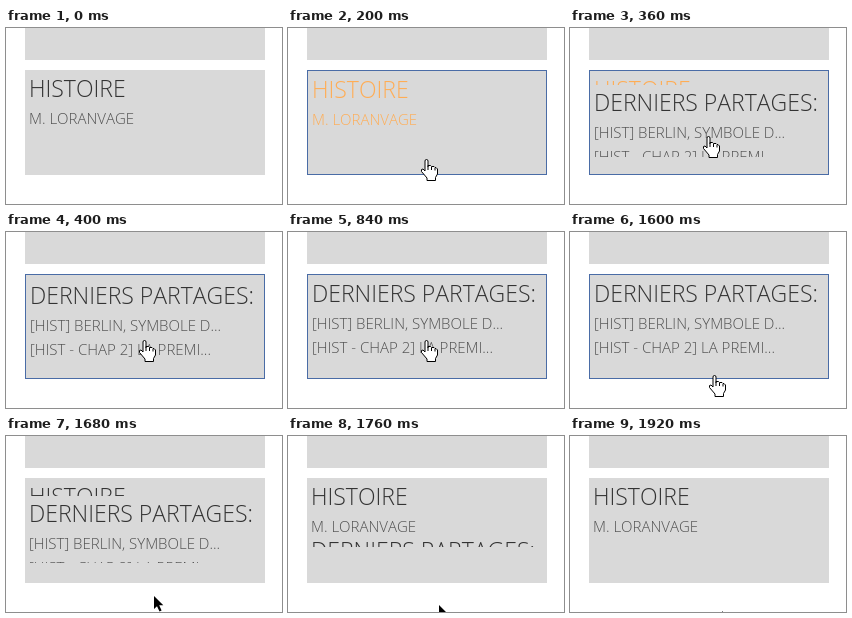
These frames come from a looping animation (276x176 px, 2240 ms). An HTML page:

```html
<!DOCTYPE html>
<html lang="fr">
<head>
<meta charset="utf-8">
<style>
  html, body { margin: 0; width: 100%; height: 100%; overflow: hidden; background: #fff; }
  #stage { display: block; }
  text { font: 300 15px "Open Sans", sans-serif; font-kerning: none; white-space: pre; fill: #505050; }
  .title { font-size: 23px; fill: #333; }
  .hover #head text { fill: #ffad55; }
  #border, #hand, .hover #arrow { visibility: hidden; }
  .hover #border, .hover #hand { visibility: visible; }
</style>
</head>
<body>
<svg id="stage" width="276" height="176">
  <rect x="19" width="240" height="32" fill="#d9d9d9"/>
  <rect x="19" y="42" width="240" height="105" fill="#d9d9d9"/>
  <rect id="border" x="19.5" y="42.5" width="239" height="104" fill="none" stroke="#4a6ca6"/>
  <svg id="head" width="234">
    <text class="title" y="26">HISTOIRE</text>
    <text y="53">M. LORANVAGE</text>
  </svg>
  <svg id="list" width="234">
    <text class="title" y="26">DERNIERS PARTAGES:</text>
    <text y="53">[HIST] BERLIN, SYMBOLE D...</text>
    <text y="77">[HIST - CHAP 2] LA PREMI...</text>
  </svg>
  <g id="pointer">
    <path id="hand" fill="#fff" stroke="#000" stroke-linejoin="round"
      d="M-1 12V2Q-1 .5 .5 .5T2 2V8V6.5H4.5L5.5 7.5H8L9 8.5H10L11.5 10V15L9.5 18.5V21.5H1V19L-4.5 12.5V10.5L-3 10ZM2 8V11M5.5 8V11M9 9V11.5"/>
    <path id="arrow" d="M0 0V13L3 10.2L5.5 15.5L7.6 14.5L5.2 9.3H9.3Z"/>
  </g>
</svg>
<script>
const LOOP = 2240, HEAD_H = 64, LIST_H = 91, SLIDE = 200;
const $ = id => document.getElementById(id);
const set = (id, attrs) => {
  for (const k in attrs) $(id).setAttribute(k, attrs[k]);
};
const progress = (t, start, span) => Math.min(1, Math.max(0, (t - start) / span));
const swing = (t, start) => 0.5 - Math.cos(Math.PI * progress(t, start, SLIDE)) / 2;

// the screen refreshes in steps, coarser while only the pointer moves
function refresh(t) {
  const snap = (step, start) => start + Math.floor((t - start) / step) * step;
  return t < 200 ? snap(80, 40) : t < 1680 ? snap(40, 0) : snap(80, 0);
}

// rises into the card, rests, then drops out to the lower right
function pointer(t) {
  if (t < 40) return [138, 200];
  const rise = 64 * (1 - progress(t, 40, 320)) ** 1.5;
  const drop = 67 * (1 - (1 - progress(t, 1488, 432)) ** 2.5);
  const drift = 0.265 * Math.max(0, drop - 14);
  return [138 + drift, 108 + rise + drop].map(Math.round);
}

function draw(t) {
  const [x, y] = pointer(t);
  const hover = y < 147;
  const open = swing(t, 220) - swing(t, 1611);
  const left = hover ? 24 : 23, top = hover ? 44 : 43;
  const headH = Math.round(HEAD_H * (1 - open));

  $('stage').classList.toggle('hover', hover);
  set('head', { x: left, y: top, height: headH });
  set('list', { x: left, y: top + headH, height: Math.round(LIST_H * open) });
  set('pointer', { transform: `translate(${x} ${y})` });
}

const begin = performance.now();
function loop() {
  draw(refresh((performance.now() - begin) % LOOP));
  requestAnimationFrame(loop);
}
loop();
</script>
</body>
</html>
```
